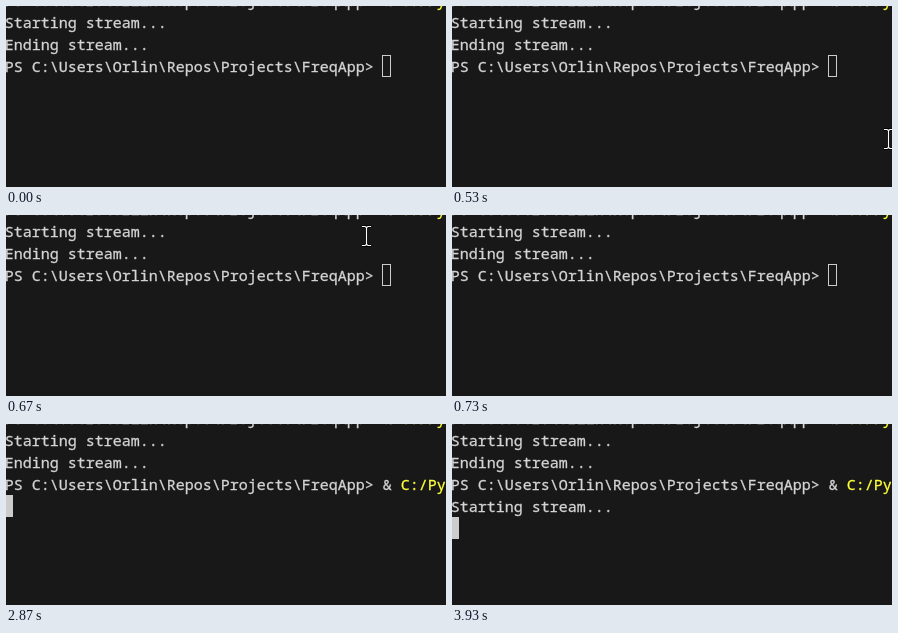
An HTML page that plays this animation: 440 px wide and 181 px high, repeating every 8 s.

```html
<!DOCTYPE html>
<html lang="en">
<head>
<meta charset="utf-8">
<title>Terminal</title>
<style>
html, body { margin: 0; width: 100%; height: 100%; overflow: hidden; background: #181818; }
svg { display: block; width: 440px; height: 181px; }
text { font: 15px "Noto Sans Mono", "DejaVu Sans Mono", monospace; fill: #d4d4d4; stroke: #d4d4d4; stroke-width: .3px; white-space: pre; }
.path { fill: #ffff38; stroke: #ffff38; }
</style>
</head>
<body>
<svg viewBox="0 0 440 181">
  <rect width="440" height="181" fill="#181818"/>
  <g id="lines"></g>
  <rect id="caret" stroke="#ccc" width="8" height="21"/>
  <g id="mouse" fill="none">
    <path d="M-4 -9.5H-1L.5 -8.5L2 -9.5H5M.5 -8.5V8.5M-4 9.5H-1L.5 8.5L2 9.5H5" stroke="#000" stroke-width="3"/>
    <path d="M-4 -9.5H-1L.5 -8.5L2 -9.5H5M.5 -8.5V8.5M-4 9.5H-1L.5 8.5L2 9.5H5" stroke="#fff" stroke-width="1.2"/>
  </g>
</svg>
<script>
const LOOP = 8000, CELL_W = 9, CELL_H = 22, LEFT = -2, TOP = -17;
const INSET = 0.75, BASE = 17; // glyph origin inside a cell
const RUN = 2870, STREAM = 3930, FOCUS = 2670;
const PROMPT = "PS C:\\Users\\Orlin\\Repos\\Projects\\FreqApp> ";
const mouseSteps = [[530, 436, 133], [600, 409, 98], [670, 360, 21]];
const MOUSE_END = 730;

const byId = id => document.getElementById(id);
const lines = byId("lines"), caret = byId("caret"), mouse = byId("mouse");

function addText(row, col, str, cls = "") {
  const el = document.createElementNS("http://www.w3.org/2000/svg", "text");
  el.setAttribute("x", LEFT + col * CELL_W + INSET);
  el.setAttribute("y", TOP + row * CELL_H + BASE);
  el.setAttribute("class", cls);
  el.textContent = str;
  lines.appendChild(el);
  return el;
}

function addCommand(row) {
  const col = PROMPT.length;
  return [addText(row, col, "& "), addText(row, col + 2, "C:/Python", "path")];
}

addText(0, 0, PROMPT);
addCommand(0);
addText(1, 0, "Starting stream...");
addText(2, 0, "Ending stream...");
addText(3, 0, PROMPT);
const command = addCommand(3);
const started = addText(4, 0, "Starting stream...");

const show = (el, on) => el.setAttribute("visibility", on ? "visible" : "hidden");

function draw(t) {
  command.forEach(el => show(el, t >= RUN));
  show(started, t >= STREAM);

  const row = t < RUN ? 3 : t < STREAM ? 4 : 5;
  const col = t < RUN ? PROMPT.length : 0;
  caret.setAttribute("x", LEFT + col * CELL_W + 0.5);
  caret.setAttribute("y", TOP + row * CELL_H + 0.5);
  caret.setAttribute("fill", t < FOCUS ? "none" : "#ccc");

  const step = mouseSteps.filter(s => s[0] <= t).pop();
  show(mouse, step && t < MOUSE_END);
  if (step) mouse.setAttribute("transform", `translate(${step[1]} ${step[2]})`);
}

const start = performance.now();
function tick() {
  draw((performance.now() - start) % LOOP);
  requestAnimationFrame(tick);
}
tick();
</script>
</body>
</html>
```
